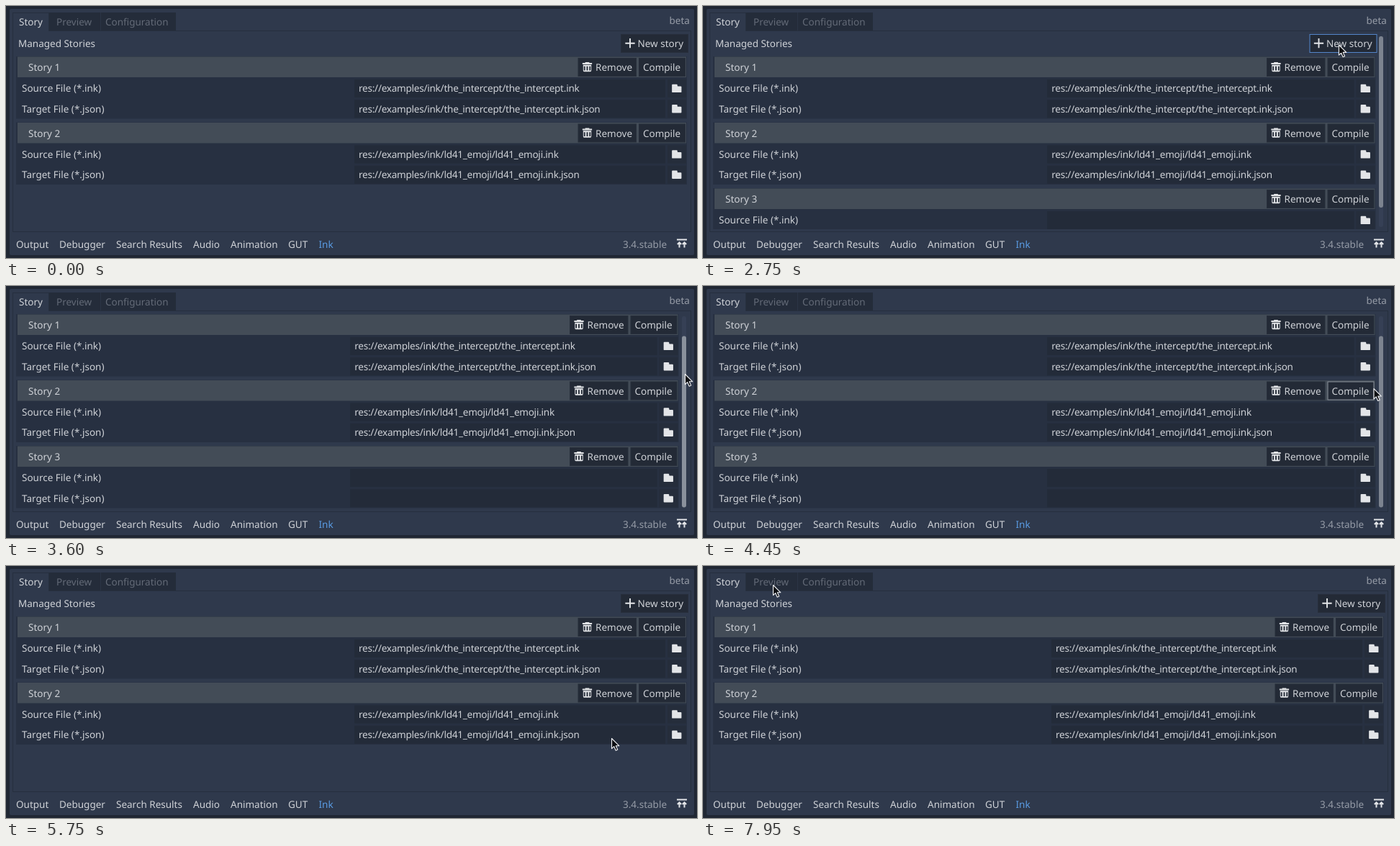
Animation, 960 px wide and 350 px high, one loop 8000 ms. Source, as an HTML page:

```html
<!DOCTYPE html>
<html lang="en">
<head>
<meta charset="utf-8">
<title>Ink panel</title>
<style>
  html, body { margin: 0; width: 100%; height: 100%; overflow: hidden; background: #202733; }
  svg { display: block; }
  text {
    font: 13.5px "Noto Sans", sans-serif; fill: #cfd2d7; white-space: pre;
    text-rendering: geometricPrecision;
  }
  .path { letter-spacing: -.225px; }
  .dim { fill: #636a77; }
  .soft { fill: #969ca7; }
  .accent { fill: #5a9ce4; }
  .icon { fill: #e3e5e8; }
  .line { fill: none; stroke: #e3e5e8; stroke-width: 2; }
  .btn rect { fill: #232a36; stroke: #272e3b; }
  .btn.hover rect { stroke: #8b919c; }
  .btn.focus rect { stroke: #5385c9; }
  .btn.pressed text { fill: #699ce8; }
</style>
</head>
<body>
<svg id="stage" width="960" height="350" viewBox="0 0 960 350">
  <defs><clipPath id="view"><rect x="10" y="38" width="940" height="272"/></clipPath></defs>
</svg>
<script>
const LOOP = 8000, STEP = 50;
const GROUP_PITCH = 91.5, THUMB_RATIO = 0.885, ICON_SCALE = 0.95;
const stage = document.getElementById('stage');

function add(parent, tag, attrs) {
  const el = document.createElementNS('http://www.w3.org/2000/svg', tag);
  for (const k in attrs) el.setAttribute(k, attrs[k]);
  return parent.appendChild(el);
}
const box = (p, x, y, width, height, fill, rx = 0) => add(p, 'rect', { x, y, width, height, fill, rx });
// Icons are drawn on a 16 px grid and placed by their centre.
const icon = (p, d, cx, cy) => add(p, 'path', {
  d, class: 'icon', transform: `translate(${cx} ${cy}) scale(${ICON_SCALE}) translate(-8 -8)`
});
function label(p, str, x, cy, cls = '') {
  add(p, 'text', { x, y: cy + 5, class: cls }).textContent = str;
}

const PLUS = 'M7 1v6H1v2h6v6h2V9h6V7H9V1z';
const FOLDER = 'M2 2q-1 0-1 1v10q0 1 1 1h12q1 0 1-1V6q0-1-1-1h-4q-1 0-1-1V3q0-1-1-1z';
const TRASH = 'M5 1v1H1v2h14V2h-4V1zM2 5v8a2 2 0 0 0 2 2h8a2 2 0 0 0 2-2V5zM3 7v6h2V7zM7 7v6h2V7zM11 7v6h2V7z';

function button(list, x, cy, w, str, textX, glyph) {
  const g = add(list.root, 'g', { class: 'btn' });
  add(g, 'rect', { x: x + .5, y: cy - 12.5, width: w - 1, height: 25 });
  if (glyph) {
    const path = icon(g, glyph, x + 13, cy - .3);
    path.setAttribute('fill-rule', 'evenodd');
  }
  label(g, str, x + textX, cy);
  const b = { g, x, y: cy - 13, w, h: 26 };
  list.buttons.push(b);
  return b;
}

// One story list; inset is the room taken by the scroll bar.
function makeList(paths, inset) {
  const holder = add(stage, 'g', { 'clip-path': 'url(#view)' });
  const list = { holder, root: add(holder, 'g', {}), buttons: [] };
  const root = list.root;
  label(root, 'Managed Stories', 17, 52);
  list.create = button(list, 854 - inset, 52, 94, 'New story', 23.5, PLUS);
  paths.forEach((path, i) => {
    const top = 70 + GROUP_PITCH * i, mid = top + 15;
    box(root, 14, top, 932 - inset, 86.5, '#273041');
    box(root, 16, top + .5, 929 - inset, 28.5, '#434c57');
    label(root, `Story ${i + 1}`, 31, mid);
    list.remove = button(list, 794.5 - inset, mid, 81.5, 'Remove', 24.5, TRASH);
    button(list, 879 - inset, mid, 65, 'Compile', 6);
    [['Source File (*.ink)', ''], ['Target File (*.json)', '.json']].forEach(([name, ext], row) => {
      const cy = mid + 29.4 + 28.3 * row, left = 484 - inset / 2;
      label(root, name, 22, cy);
      box(root, left, cy - 12.4, 916 - inset - left, 25, '#232b39');
      if (path) label(root, `res://examples/ink/${path}.ink${ext}`, left + 6, cy, 'path');
      box(root, 919 - inset, cy - 12.4, 26, 25, '#252d3b');
      icon(root, FOLDER, 931.8 - inset, cy);
    });
  });
  return list;
}

// Window, tabs and bottom bar
box(stage, 5, 4, 951, 342, '#2f394c', 2);
box(stage, 9, 34, 943, 280, '#262f3e');
box(stage, 10, 35, 941, 278, '#2f394c');
box(stage, 60, 9, 176, 25, '#242c3a');
box(stage, 131, 9, 1, 25, '#2b3445');
box(stage, 9, 9, 51, 26, '#262f3e');
box(stage, 10, 10, 49, 26, '#2f394c');
label(stage, 'Story', 18, 21.5);
label(stage, 'Preview', 70, 21.5, 'dim');
label(stage, 'Configuration', 138, 21.5, 'dim');
label(stage, 'beta', 921.5, 20, 'soft');
[['Output', 14], ['Debugger', 74], ['Search Results', 153], ['Audio', 260],
 ['Animation', 312], ['GUT', 392]].forEach(([s, x]) => label(stage, s, x, 331));
label(stage, 'Ink', 434.5, 331, 'accent');
label(stage, '3.4.stable', 857, 331, 'soft');
add(stage, 'path', {
  d: 'M0 1H14M3.5 12V5M10.5 12V5M.8 7.5L3.5 4.8L6.2 7.5M7.8 7.5L10.5 4.8L13.2 7.5',
  class: 'line', transform: 'translate(932 323.5)'
});

const stories = ['the_intercept/the_intercept', 'ld41_emoji/ld41_emoji'];
const wide = makeList(stories, 0);
const narrow = makeList([...stories, ''], 11.5);
const bar = add(narrow.holder, 'g', {});
box(bar, 939, 42, 6, 265, '#364055', 3);
const thumb = box(bar, 939, 42, 6, 238, '#7c838f', 3);
const pointer = add(stage, 'path', {
  d: 'M.5 .5V14.6L3.7 11.7L6.2 17.2L8.7 16.1L6.3 10.8H10.9Z',
  fill: '#0c0e12', stroke: '#f2f3f5', 'stroke-width': 1.1, 'stroke-linejoin': 'round'
});

// time, x, y
const MOVES = [
  [400, 443, 313], [450, 548, 196], [500, 648, 82], [550, 726, 0], [600, 782, 26], [650, 800, 55],
  [800, 800, 55], [1550, 875, 54], [1650, 878, 54], [1800, 882, 53], [2700, 882, 53],
  [3400, 943, 94], [3450, 943, 95], [3500, 943, 97], [3550, 943, 109], [3600, 943, 122],
  [3850, 942, 131], [4300, 942, 131], [5050, 841, 239], [6200, 841, 239], [6550, 590, 280],
  [6700, 590, 280], [7000, 257, 161], [7200, 257, 161], [7950, 97, 26]
];
const SCROLL = [[3450, 0], [3500, 2.5], [3550, 16], [3600, 31]];

function sample(keys, t) {
  const i = keys.findIndex(k => k[0] > t);
  if (i === 0) return keys[0].slice(1);
  if (i < 0) return keys[keys.length - 1].slice(1);
  const a = keys[i - 1], b = keys[i];
  const u = (t - a[0]) / (b[0] - a[0]), e = u * u * (3 - 2 * u);
  return a.slice(1).map((v, n) => v + (b[n + 1] - v) * e);
}
const within = (t, from, to) => t >= from && t < to;

function render(time) {
  const t = Math.floor((time % LOOP) / STEP) * STEP;
  const [x, y] = sample(MOVES, t), [scroll] = sample(SCROLL, t);
  const shown = t >= 400, three = within(t, 2350, 5750);
  const list = three ? narrow : wide;

  wide.holder.style.display = three ? 'none' : '';
  narrow.holder.style.display = three ? '' : 'none';
  narrow.root.setAttribute('transform', `translate(0 ${-scroll})`);
  thumb.setAttribute('y', 42 + scroll * THUMB_RATIO);
  const held = within(t, 3450, 4050);
  thumb.setAttribute('fill', held ? '#8a919c' : x >= 939 ? '#969ca7' : '#7c838f');

  let focus = null;
  if (within(t, 2250, 5650)) focus = list.create;
  else if (within(t, 5650, 5750)) focus = narrow.remove;
  const pressed = within(t, 2250, 2350) || within(t, 5650, 5700);
  const py = y + (three ? scroll : 0);
  for (const b of list.buttons) {
    const hover = shown && !held && x >= b.x && x < b.x + b.w && py >= b.y && py < b.y + b.h;
    b.g.classList.toggle('hover', hover);
    b.g.classList.toggle('focus', b === focus);
    b.g.classList.toggle('pressed', b === focus && pressed);
  }
  pointer.style.display = shown ? '' : 'none';
  pointer.setAttribute('transform', `translate(${x} ${y})`);
}

const start = performance.now();
function tick() {
  render(performance.now() - start);
  requestAnimationFrame(tick);
}
tick();
</script>
</body>
</html>
```
